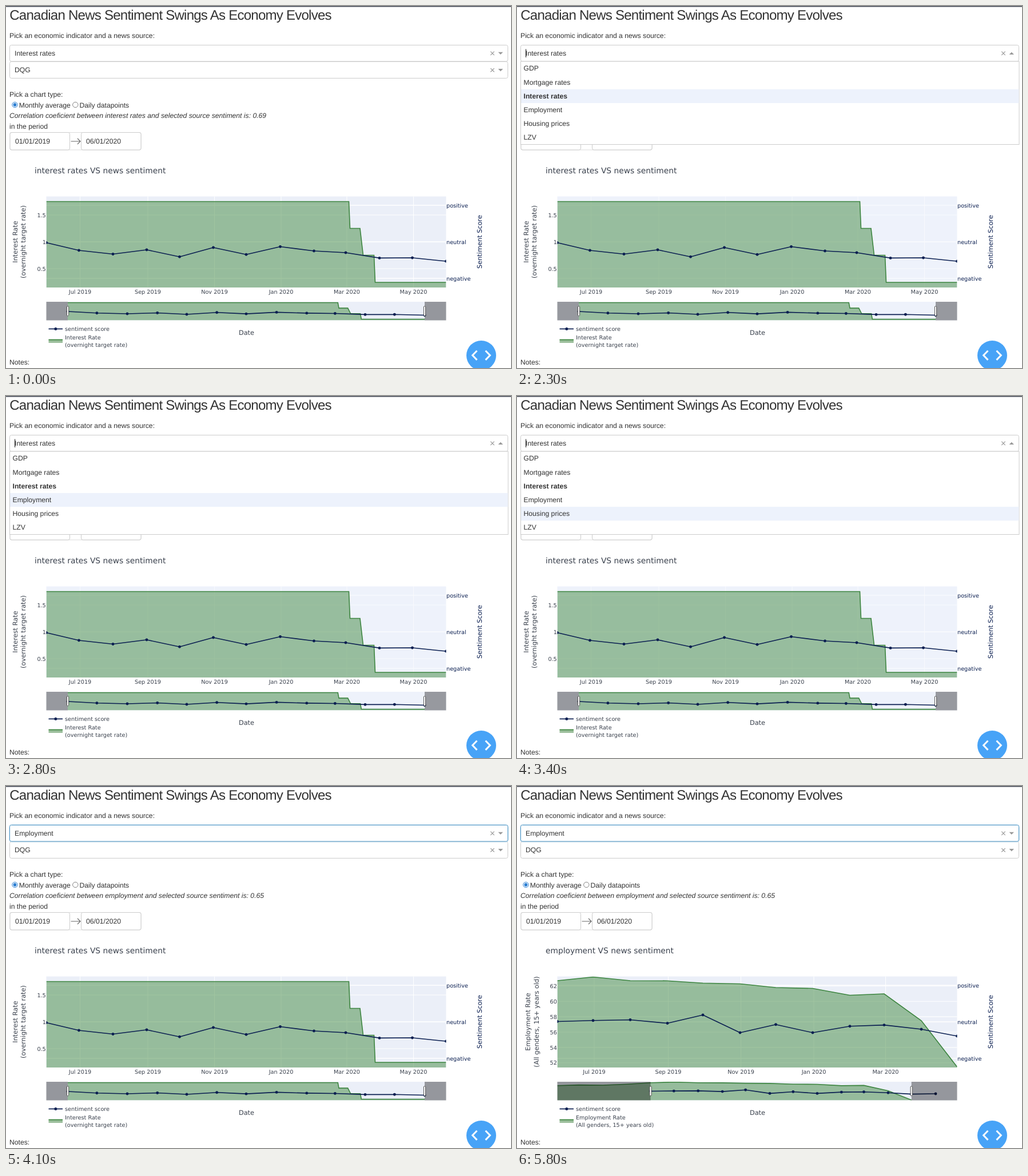
An HTML page that plays this animation: 883x634 px, repeating every 6.2 s.

```html
<!DOCTYPE html>
<html lang="en">
<head>
<meta charset="utf-8">
<title>News sentiment dashboard</title>
<style>
html, body { margin: 0; width: 100%; height: 100%; overflow: hidden; background: #fff; }
svg { display: block; width: 883px; height: 634px; }
text { font: 12.2px "Liberation Sans", Arial, sans-serif; fill: #333; text-rendering: geometricPrecision; white-space: pre; }
.title { font-size: 24.1px; letter-spacing: -.79px; }
.bold { font-weight: bold; }
.italic { font-style: italic; }
.plot text { font: 9.7px "DejaVu Sans", sans-serif; fill: #3a414d; }
.plot .head { font-size: 13.8px; }
.plot .axis { font-size: 11.35px; }
.plot .score { fill: #0b1f51; }
.mid { text-anchor: middle; }
.end { text-anchor: end; }
</style>
</head>
<body>
<svg id="stage" viewBox="0 0 883 634"></svg>
<script>
const LOOP = 6200;
const OPEN = 1900, CLOSE = 3900, RESULT = 4000, REDRAW = 4300;
const NAVY = '#0b1f51', GREEN = '#3d8540', FILL = 'rgba(67,138,67,.5)';
const LEFT = 70.5, RIGHT = 769.5, TOP = 333.5, BASE = 493;
const stage = document.getElementById('stage');

function el(parent, tag, attrs = {}, content) {
  const node = document.createElementNS('http://www.w3.org/2000/svg', tag);
  for (const key in attrs) node.setAttribute(key, attrs[key]);
  if (content !== undefined) node.textContent = content;
  parent.appendChild(node);
  return node;
}
const group = (parent, attrs) => el(parent, 'g', attrs);
const text = (parent, x, y, str, cls = '') => el(parent, 'text', { x, y, class: cls }, str);
const rect = (parent, x, y, width, height, fill, more) =>
  el(parent, 'rect', { x, y, width, height, fill, ...more });
const path = (parent, d, stroke, width = 1, more) =>
  el(parent, 'path', { d, fill: 'none', stroke, 'stroke-width': width, ...more });
const circle = (parent, cx, cy, r, fill, more) => el(parent, 'circle', { cx, cy, r, fill, ...more });
const line = pts => 'M' + pts.map(p => p.join(',')).join('L');
const show = (node, on) => node.setAttribute('display', on ? 'inline' : 'none');
const vertical = (parent, x, str, cls) =>
  el(parent, 'text', { transform: `translate(${x} 413) rotate(-90)`, class: 'axis mid ' + cls }, str);

function box(parent, x, y, w, h, stroke = '#ccc') {
  return rect(parent, x, y, w, h, '#fff', { rx: 3, stroke });
}
function cross(parent, y) {
  path(parent, `M847.3 ${y - 3.2}l6.4 6.4m0 -6.4l-6.4 6.4`, '#999', 1.2);
}
function arrow(parent, y, up) {
  const d = up ? -4.4 : 4.4;
  return el(parent, 'path', { d: `M860.6 ${y - d / 2}h8.4l-4.2 ${d}z`, fill: '#999' });
}

function area(parent, pts, base) {
  const first = pts[0][0], last = pts[pts.length - 1][0];
  el(parent, 'path', { d: `${line(pts)}L${last},${base}L${first},${base}z`, fill: FILL });
  path(parent, line(pts), GREEN, 1.6);
}
function series(parent, pts) {
  path(parent, line(pts), NAVY, 1.6, { 'stroke-linejoin': 'round' });
  pts.forEach(([x, y]) => circle(parent, x, y, 2.45, NAVY));
}

const backs = [], grids = [];
function back(parent, y, h) {
  backs.push(rect(parent, LEFT, y, RIGHT - LEFT, h, '#ebeff8'));
}

function chart(c) {
  const g = group(stage, { class: 'plot' });
  text(g, 50, 293, c.title, 'head');

  back(g, TOP, BASE - TOP);
  const grid = group(g);
  grids.push(grid);
  c.months.forEach(([x]) => path(grid, `M${x} ${TOP}V${BASE}`, '#fff', 1.1));
  c.ticks.forEach(([y]) => path(grid, `M${LEFT} ${y}H${RIGHT}`, '#fff', 1.1));
  [349, 413, 477].forEach(y => path(grid, `M${LEFT} ${y}H${RIGHT}`, '#fff', 1.5));

  const main = group(g, { 'clip-path': 'url(#plotClip)' });
  area(main, c.area, BASE);
  series(main, c.score);

  c.months.forEach(([x, s]) => text(g, x, 503.7, s, 'mid'));
  c.ticks.forEach(([y, s]) => text(g, 69.8, y + 3.6, s, 'end'));
  ['positive', 'neutral', 'negative'].forEach((s, i) => text(g, 770, 352.5 + 64 * i, s, 'score'));
  vertical(g, c.labelX, c.label, '');
  vertical(g, c.labelX + 14.7, c.unit, '');
  vertical(g, 832, 'Sentiment Score', 'score');

  // Range slider: the same data, squeezed between the two handles
  const [from, to] = c.range;
  const small = (pts, y0, y1, k) => pts.map(([x, y]) =>
    [from + (x - LEFT) * (to - from) / (RIGHT - LEFT), y1 + (y - y0) * k]);
  back(g, 518, 32.5);
  const mini = group(g, { 'clip-path': 'url(#miniClip)' });
  area(mini, [...c.before, ...small(c.area, c.area[0][1], c.miniTop, c.miniScale)], 550.5);
  series(mini, [...small(c.score, c.score[0][1], c.miniScore, .2), ...c.after]);
  rect(g, LEFT, 518, from - LEFT, 32.5, 'rgba(0,0,0,.37)');
  rect(g, to, 518, RIGHT - to, 32.5, 'rgba(0,0,0,.37)');
  [from, to].forEach(x => rect(g, x - 1.6, 526, 3.2, 16.5, '#fff', { rx: 1, stroke: '#444', 'stroke-width': .9 }));

  text(g, 420.5, 575.5, 'Date', 'axis mid');
  path(g, 'M74.5 565.5H99', NAVY, 1.7);
  circle(g, 86.8, 565.5, 2.5, NAVY);
  text(g, 103, 569, 'sentiment score');
  rect(g, 74.5, 584.5, 24.5, 5.5, '#9bbe9b');
  path(g, 'M74.5 584.5H99', GREEN, 1.7);
  text(g, 103, 584, c.label);
  text(g, 103, 596.5, c.unit);
  return g;
}

const defs = el(stage, 'defs');
[['plotClip', TOP, BASE - TOP], ['miniClip', 518, 32.5]].forEach(([id, y, h]) =>
  rect(el(defs, 'clipPath', { id }), LEFT, y, RIGHT - LEFT, h));

rect(stage, 0, 0, 883, 634, '#fff');
rect(stage, 0, 0, 883, 1.6, '#4b505c');
text(stage, 6.2, 24, 'Canadian News Sentiment Swings As Economy Evolves', 'title');
text(stage, 6, 56, 'Pick an economic indicator and a news source:');
text(stage, 6, 159, 'Pick a chart type:');
circle(stage, 15.5, 173, 4.7, '#fff', { stroke: '#2d7fd3' });
circle(stage, 15.5, 173, 2.9, '#2d7fd3');
text(stage, 22.8, 177.5, 'Monthly average');
circle(stage, 121.3, 173, 4.7, '#fff', { stroke: '#777', 'stroke-width': .9 });
text(stage, 128.5, 177.5, 'Daily datapoints');
const summary = text(stage, 6, 196, '', 'italic');
text(stage, 6, 215.3, 'in the period');
rect(stage, 7, 221.5, 229, 30.5, '#fff', { rx: 2, stroke: '#dcdcdc' });
box(stage, 7, 221.5, 104.5, 30.5);
box(stage, 131.5, 221.5, 104.5, 30.5);
text(stage, 16, 241.3, '01/01/2019');
text(stage, 140, 241.3, '06/01/2020');
path(stage, 'M113.5 237H130M125 232l5 5l-5 5', '#666', 1.1);
text(stage, 6, 627.5, 'Notes:');

const rates = chart({
  title: 'interest rates VS news sentiment',
  label: 'Interest Rate', unit: '(overnight target rate)', labelX: 19.5,
  months: [[129.5, 'Jul 2019'], [248, 'Sep 2019'], [364.5, 'Nov 2019'],
    [481, 'Jan 2020'], [596, 'Mar 2020'], [712.5, 'May 2020']],
  ticks: [[366, '1.5'], [413, '1'], [460, '0.5']],
  area: [[70.5, 342.5], [599.5, 342.5], [601.5, 389.5], [619, 389.5], [624.5, 436.5],
    [643.5, 436.5], [645.5, 484], [769.5, 484]],
  score: [[70.5, 414.5], [127.5, 428], [187, 434.5], [246, 427], [303.5, 439.3], [362.5, 423],
    [420, 435.3], [479.5, 421.5], [538.5, 429], [594, 432], [653, 441.4], [710.5, 441], [769.5, 447]],
  range: [108, 732], before: [], after: [], miniTop: 519.5, miniScale: .205, miniScore: 535
});
const jobs = chart({
  title: 'employment VS news sentiment',
  label: 'Employment Rate', unit: '(All genders, 15+ years old)', labelX: 23,
  months: [[135, 'Jul 2019'], [264.5, 'Sep 2019'], [391.5, 'Nov 2019'], [519, 'Jan 2020'], [644.5, 'Mar 2020']],
  ticks: [0, 1, 2, 3, 4, 5].map(i => [350.3 + 26.9 * i, 62 - 2 * i]),
  area: [[70.5, 341], [133, 334.5], [198, 341], [263, 341.2], [325, 345.2], [390, 346.5],
    [452.5, 353], [517, 354.5], [582, 366.5], [642, 364], [707, 411], [769.5, 492]],
  score: [[70.5, 412.5], [133, 410.7], [198, 409.5], [263, 415.5], [325, 401], [390, 432],
    [452.5, 417.7], [517, 432], [582, 420.7], [642, 418.6], [707, 426], [769.5, 438]],
  range: [233.5, 689.7], before: [[70.5, 524.8], [108, 523.6], [150, 524], [192, 522.3]],
  after: [[732, 539]], miniTop: 519.8, miniScale: .2, miniScore: 534.5
});

box(stage, 6.5, 97.5, 871, 29);
text(stage, 15, 116.3, 'DQG');
cross(stage, 112.3);
arrow(stage, 112.3);
const glow = rect(stage, 5.6, 67.5, 872.8, 30.6, 'none', { rx: 4, stroke: '#cfe3ef' });
const field = box(stage, 6.5, 68.5, 871, 28.5);
const choice = text(stage, 15, 87, '');
cross(stage, 82.9);
const down = arrow(stage, 82.9), up = arrow(stage, 82.9, true);

const ROW = 24.15, MENU = 97.5;
const menu = group(stage);
rect(menu, 6.5, 97, 871.5, 145.5, '#fff', { stroke: '#ccc' });
const hover = rect(menu, 7, 0, 870.5, ROW, '#edf2fc');
['GDP', 'Mortgage rates', 'Interest rates', 'Employment', 'Housing prices', 'LZV'].forEach((s, i) =>
  text(menu, 11.5, MENU + ROW * i + 15.9, s, i === 2 ? 'bold' : ''));
path(menu, 'M15.6 75.5V90', '#222', 1.1);

circle(stage, 831, 612, 26, '#47a3f7');
path(stage, 'M823.5 603.7l-7.8 8.1l7.8 8.1M838.5 603.7l7.8 8.1l-7.8 8.1', '#fff', 3);

function hovered(t) {
  if (t < 2700) return 2;
  if (t < 2900) return 3;
  return t < 3600 ? 4 : 3;
}

function draw(t) {
  const open = t >= OPEN && t < CLOSE, picked = t >= CLOSE, done = t >= RESULT;
  show(menu, open);
  show(up, open);
  show(down, !open);
  show(glow, picked);
  field.setAttribute('stroke', picked ? '#4f98c8' : '#ccc');
  choice.textContent = picked ? 'Employment' : 'Interest rates';
  hover.setAttribute('y', MENU + ROW * hovered(t));
  summary.textContent = 'Correlation coeficient between ' + (done ? 'employment' : 'interest rates') +
    ' and selected source sentiment is: ' + (done ? '0.65' : '0.69');
  show(rates, t < REDRAW);
  show(jobs, t >= REDRAW);
  backs.forEach(b => b.setAttribute('fill', open ? '#eef2fb' : '#ebeff8'));
  grids.forEach(g => g.setAttribute('opacity', open ? .6 : 1));
}

const start = performance.now();
function tick() {
  draw((performance.now() - start) % LOOP);
  requestAnimationFrame(tick);
}
tick();
</script>
</body>
</html>
```
